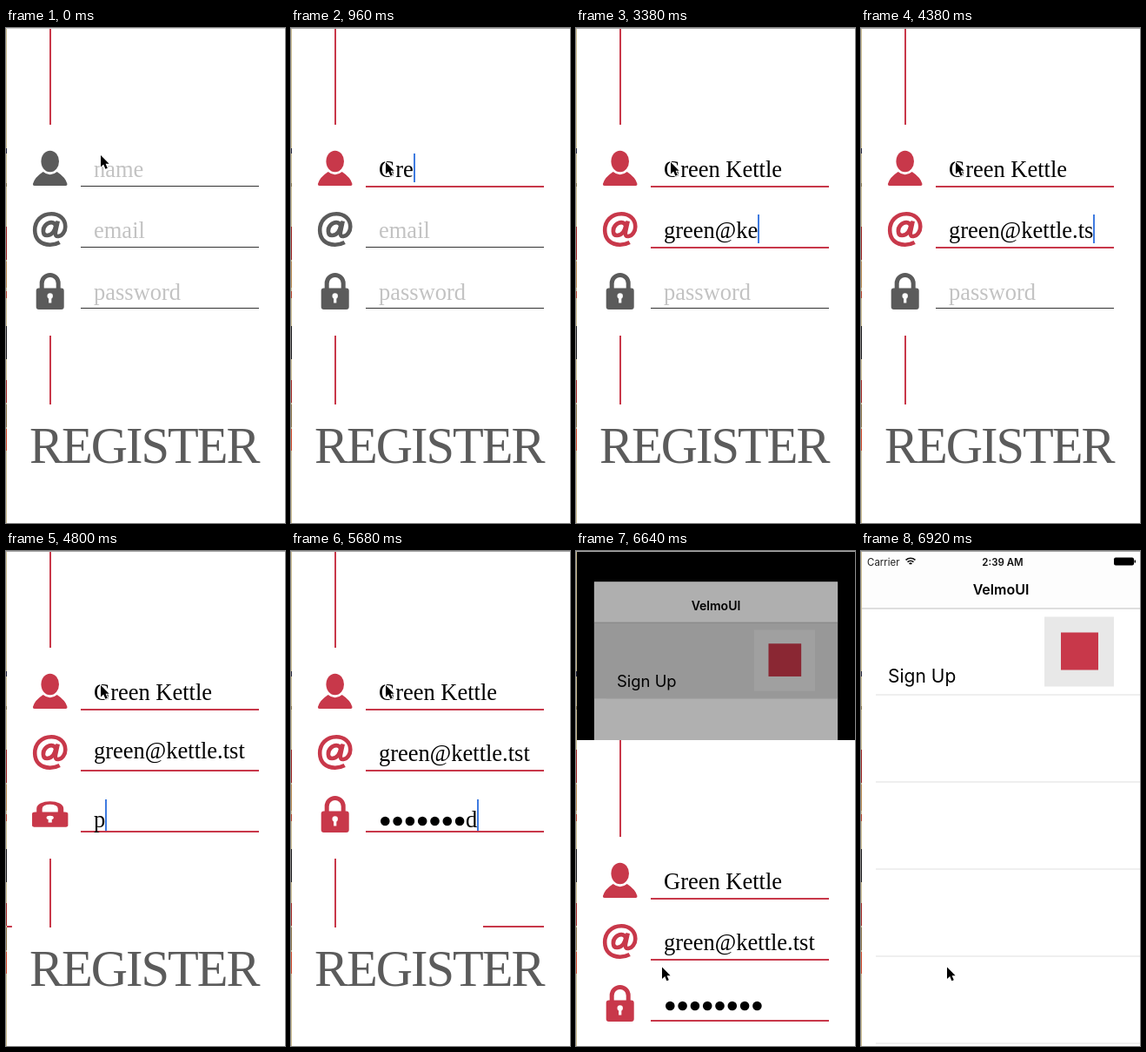
An HTML page with a canvas that plays this animation: 321x568 px, repeating every 7180 ms.

```html
<!DOCTYPE html>
<html lang="en">
<head>
<meta charset="utf-8">
<title>Register form</title>
<style>
html, body { margin: 0; width: 100%; height: 100%; overflow: hidden; background: #fff; }
canvas { display: block; }
</style>
</head>
<body>
<canvas id="stage" width="321" height="568"></canvas>
<script>
const c = document.getElementById('stage').getContext('2d');
const W = 321, H = 568, LOOP = 7180;
const RED = '#c8384a', GRAY = '#5b5b5b', HINT = '#c3c3c3';
const SERIF = '"Liberation Serif", serif', SANS = 'Inter, sans-serif';
const FIELD_FONT = '26.5px ' + SERIF;

const fields = [
  { hint: 'name', text: 'Green Kettle', base: 171, line: 181, caret: 144, icon: person, mid: 161,
    focus: 500, blur: 2072, morph: 500, drop: 2190,
    keys: [740, 860, 960, 1040, 1120, 1180, 1340, 1440, 1660, 1820, 1920, 2020] },
  { hint: 'email', text: 'green@kettle.tst', base: 241, line: 251, caret: 214, icon: atSign, mid: 231,
    focus: 2072, blur: 4580, morph: 2072, drop: 4600,
    keys: [2540, 2600, 2660, 2720, 2780, 3100, 3320, 3380, 3600, 3760, 3860, 3960, 4120, 4280, 4360, 4440] },
  { hint: 'password', text: 'password', base: 312, line: 321, caret: 285, icon: lock, mid: 302,
    focus: 4580, blur: 6180, morph: 4692, drop: Infinity, secret: true,
    keys: [4740, 4880, 5000, 5120, 5280, 5440, 5500, 5680] }
];

const part = (t, from, to) => Math.min(1, Math.max(0, (t - from) / (to - from)));
const smooth = p => p * p * (3 - 2 * p);

function rect(x, y, w, h, color) {
  c.fillStyle = color;
  c.fillRect(x, y, w, h);
}

function text(str, x, y, font, color, align = 'left') {
  c.font = font;
  c.fillStyle = color;
  c.textAlign = align;
  c.fillText(str, x, y);
}

function dot(x, y, r, color) {
  c.fillStyle = color;
  c.beginPath();
  c.arc(x, y, r, 0, 7);
  c.fill();
}

function stroke(d, width, color) {
  c.lineWidth = width;
  c.strokeStyle = color;
  c.stroke(new Path2D(d));
}

// Icons are drawn around their own centre.
function person(color) {
  c.fillStyle = color;
  c.beginPath();
  c.ellipse(0, -8, 10.3, 12.2, 0, 0, 7);
  c.fill();
  c.fill(new Path2D('M-19.8 18Q-18 10.5 -8 4Q0 10.5 8 4Q18 10.5 19.8 18Q20 20 18 20H-18Q-20 20 -19.8 18Z'));
}

function atSign(color) {
  c.lineCap = 'butt';
  stroke('M6.5 -4C5 -9 -1 -9 -5 -5C-9 -1 -9 7 -3.5 7C2 7 5.5 2 6.5 -4Z', 4.6, color);
  stroke('M9 -9.5L6.3 3C5.6 7 7 8.3 9.5 8C14 7.5 17.6 2.5 17.6 -3C17.6 -12 10.5 -17.7 1.5 -17.7C-10 -17.7 -17.5 -9.5 -17.5 1C-17.5 11.5 -10.5 17.7 0 17.7Q6 17.7 11 15', 4.6, color);
}

function lock(color) {
  stroke('M-9.5 -1V-9A9.5 9.5 0 0 1 9.5 -9V-1', 5, color);
  c.fillStyle = color;
  c.beginPath();
  c.roundRect(-16, -3.5, 32, 24.5, 3);
  c.fill();
  dot(0, 5.5, 3.2, '#fff');
  rect(-1.6, 6, 3.2, 7.5, '#fff');
}

function drawIcon(f, t) {
  const scales = [1, 1.3, .7, 1.3, 1];
  const p = part(t, f.morph, f.morph + 448) * 4;
  const i = Math.min(3, Math.floor(p));
  const s = scales[i] + (scales[i + 1] - scales[i]) * (p - i);
  c.save();
  c.translate(50.7, f.mid);
  c.scale(s, 2 - s);
  f.icon(t < f.morph ? GRAY : RED);
  c.restore();
}

function drawField(f, t) {
  const n = f.keys.filter(k => k <= t).length;
  const typed = f.text.slice(0, n);
  let end = 101;
  drawIcon(f, t);
  rect(86, f.line, 205, n ? 2 : 1, n ? RED : '#333');
  c.font = FIELD_FONT;
  if (!n) {
    text(f.hint, 101, f.base, FIELD_FONT, HINT);
  } else if (f.secret) {
    const sent = t >= 6480, dots = sent ? n : n - 1;
    for (let i = 0; i < dots; i++) dot(108.3 + 14.3 * i, sent ? 305 : 310, 5.3, '#000');
    end += 14.3 * dots;
    if (!sent) {
      text(typed[n - 1], end, 317, FIELD_FONT, '#000');
      end += c.measureText(typed[n - 1]).width;
    }
  } else {
    const lift = t < f.drop ? 0 : 13 * (1 - part(t, f.drop, f.drop + 360)) ** 2;
    text(typed, 101, f.base - lift, FIELD_FONT, '#000');
    end += c.measureText(typed).width;
  }
  if (t >= f.focus && t < f.blur) rect(Math.round(end), f.caret, 2, f.secret ? 36 : 33, '#3f7be0');
}

function drawForm(t, dy) {
  c.save();
  c.translate(0, dy);
  rect(1, 0, 320, H, '#fff');
  rect(50, 0, 2, 111, RED);
  rect(50, 353, 2, 79, RED);
  if (t >= 4746) rect(-79 + 300 * smooth(part(t, 4746, 5140)), 430, 70, 2, RED);
  fields.forEach(f => drawField(f, t));
  c.letterSpacing = '-2px';
  text('REGISTER', 27, 498.5, '58.5px ' + SERIF, GRAY);
  c.letterSpacing = '0px';
  c.restore();
}

function drawStatus() {
  text('Carrier', 7, 16, '11.5px ' + SANS, '#222');
  text('2:39 AM', 163, 16, '600 11.5px ' + SANS, '#111', 'center');
  for (const r of [3, 6, 9]) {
    c.lineWidth = 1.6;
    c.strokeStyle = '#111';
    c.beginPath();
    c.arc(57, 16, r - .8, -2.3, -.84);
    c.stroke();
  }
  c.fillStyle = '#000';
  c.beginPath();
  c.roundRect(291, 7, 23, 9, 2);
  c.fill();
  rect(314.5, 10, 1.5, 3, '#000');
}

function drawList(t, p) {
  const scale = .8 + .2 * p, up = 20 * (1 - p);
  rect(1, 0, 320, H, '#000');
  c.save();
  c.translate(161, 284.5);
  c.scale(scale, scale);
  c.translate(-161, -284);
  c.beginPath();
  c.rect(1, 0, 320, H);
  c.clip();
  rect(1, 0, 320, H, '#fff');
  c.translate(0, -up);
  c.globalAlpha = 1 - part(t, 6860, 6920);
  rect(1, 65, 320, 100, '#dcdcdc');
  c.globalAlpha = 1;
  for (let y = 164; y < 600; y += 100) rect(17, y, 304, 1, '#e0e0e0');
  text('Sign Up', 31, 150, '21px ' + SANS, '#000');
  rect(211, 75, 80, 80, '#e8e8e8');
  rect(230, 93, 43, 43, RED);
  rect(1, 0, 320, 65, '#fdfdfd');
  rect(1, 65, 320, 1, '#bdbdbd');
  text('VelmoUI', 161, 49, '600 16px ' + SANS, '#000', 'center');
  if (p === 1) drawStatus();
  c.translate(0, up);
  rect(1, 0, 320, H, `rgba(0,0,0,${.5 * (1 - p)})`);
  c.restore();
}

function drawEdge(t) {
  rect(0, 0, 1, H, '#cbbd92');
  const bands = [[138, 6, '#26283c'], [178, 4, '#8a7a50'], [228, 38, '#9c2320'], [268, 30, '#b98a50'],
    [302, 8, '#b5442a'], [342, 38, '#1b1a1c'], [404, 26, '#a32a24'], [432, 26, '#8d7448'], [460, 25, '#cf4a28']];
  bands.forEach(([y, h, color]) => rect(0, y, 1, h, color));
  rect(0, 0, W, 1, t < 500 ? '#d2d2d2' : '#a8a8a8');
}

function drawCursor(t) {
  const e = smooth(part(t, 5740, 6380));
  const x = 109 - 10 * e - 10 * Math.sin(Math.PI * e);
  const y = 146 + 8 * smooth(part(t, 220, 320)) + 323.5 * e;
  c.save();
  c.translate(x, y);
  const arrow = new Path2D('M0 0V13.5L3.2 10.6L5.4 15.8L7.8 14.8L5.6 9.7H9.6Z');
  c.lineJoin = 'round';
  c.lineWidth = 2;
  c.strokeStyle = '#fff';
  c.stroke(arrow);
  c.fillStyle = '#000';
  c.fill(arrow);
  c.restore();
}

function draw(now) {
  const t = now % LOOP;
  const p = smooth(part(t, 6481, 6861));
  if (p > 0) drawList(t, p);
  if (p < 1) drawForm(t, Math.round(H * p));
  drawEdge(t);
  drawCursor(t);
}

const start = performance.now();
function tick() {
  draw(performance.now() - start);
  requestAnimationFrame(tick);
}
tick();
</script>
</body>
</html>
```
